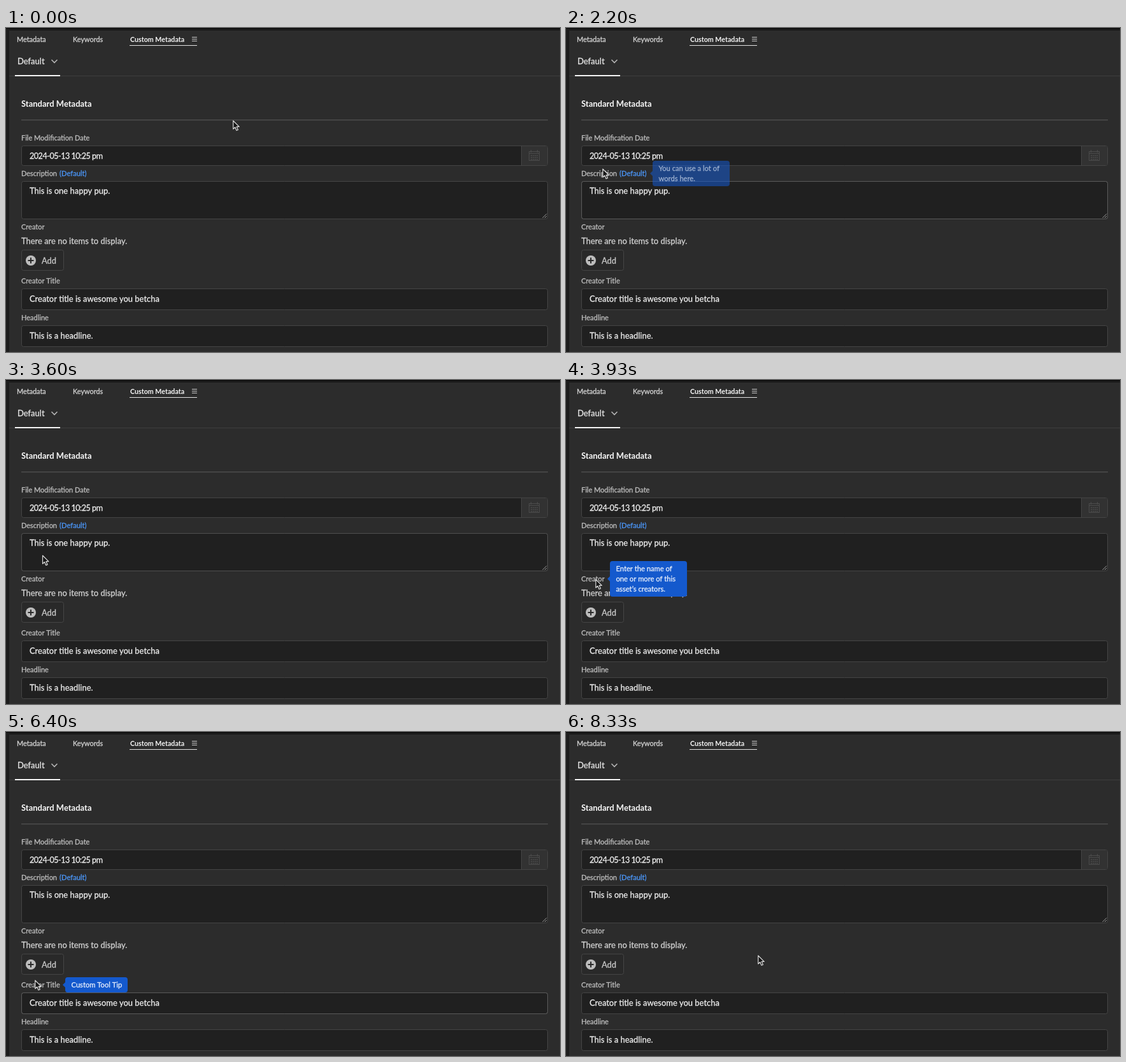
These frames come from a looping animation (870 by 510 pixels, 8.47 s). An HTML page with a canvas:

```html
<!DOCTYPE html>
<html lang="en">
<head>
<meta charset="utf-8">
<title>Custom Metadata</title>
<style>
html, body { margin: 0; width: 100%; height: 100%; overflow: hidden; background: #2b2b2b; }
canvas { display: block; }
</style>
</head>
<body>
<canvas id="stage" width="870" height="510"></canvas>
<script>
const ctx = document.getElementById('stage').getContext('2d');
const LOOP = 8470, RATE = 0.015;
const LEFT = 24, WIDE = 827, INDENT = 37;
const BG = '#2c2c2c', FIELD = '#202020', EDGE = '#454545', HOVER = '#5a5a5a';
const BLUE = '#1459cd', LABEL = '#bebebe', VALUE = '#ededed', LINK = '#4b96f8';

// Pointer moves: each leg bends towards (cx, cy) on its way to (x, y)
const home = { x: 356, y: 146 };
const legs = [
  { from: 2, to: 15, x: 110, y: 182, cx: -75, cy: 85, pow: 1 },
  { from: 19, to: 21, x: 111, y: 178, cx: 110, cy: 180, pow: 1 },
  { from: 24, to: 33, x: 57, y: 222, cx: 215, cy: 290, pow: 1 },
  { from: 48, to: 59, x: 46, y: 314, cx: 64, cy: 270, pow: 0.9 },
  { from: 85, to: 96, x: 45, y: 391, cx: 18, cy: 350, pow: 1.6 },
  { from: 117, to: 125, x: 301, y: 352, cx: 150, cy: 375, pow: 1 }
];

const tips = [
  { x: 139, mid: 229, w: 121, from: 32, to: 51, lines: ['You can use a lot of', 'words here.'] },
  { x: 69, mid: 313, w: 121, from: 56, to: 88, lines: ['Enter the name of', 'one or more of this', 'asset\u2019s creators.'] },
  { x: 93, mid: 398, w: 98, from: 93, to: 119, lines: ['Custom Tool Tip'] }
];

const clamp = v => Math.min(1, Math.max(0, v));
const span = (k, from, to, time) => clamp((k - from) / time) * (1 - clamp((k - to) / time));
const bend = (a, c, b, p) => a * (1 - p) ** 2 + 2 * c * p * (1 - p) + b * p * p;

function text(str, x, y, size, color, weight = 400, gap = 0) {
  ctx.font = `${weight} ${size}px Lato, "Open Sans", sans-serif`;
  ctx.letterSpacing = gap + 'px';
  ctx.fillStyle = ctx.strokeStyle = color;
  ctx.fillText(str, x, y);
  if (weight > 400) return;
  ctx.lineWidth = 0.3;
  ctx.strokeText(str, x, y);
}

const label = (str, y) => text(str, LEFT, y, 11, LABEL);
const value = (str, y) => text(str, INDENT, y, 12.95, VALUE);

function rect(x, y, w, h, color) {
  ctx.fillStyle = color;
  ctx.fillRect(x, y, w, h);
}

function line(points, color, width = 1) {
  ctx.beginPath();
  points.forEach(p => ctx.lineTo(...p));
  ctx.strokeStyle = color;
  ctx.lineWidth = width;
  ctx.stroke();
}

function box(y, h, hover = 0, w = WIDE, fill = FIELD) {
  ctx.beginPath();
  ctx.roundRect(LEFT + 0.5, y + 0.5, w - 1, h - 1, 3);
  ctx.fillStyle = fill;
  ctx.fill();
  ctx.lineWidth = 1;
  ctx.strokeStyle = EDGE;
  ctx.stroke();
  ctx.globalAlpha = hover;
  ctx.strokeStyle = HOVER;
  ctx.stroke();
  ctx.globalAlpha = 1;
}

function calendar(x, y) {
  const c = '#4b4b4b';
  ctx.strokeStyle = c;
  ctx.lineWidth = 1;
  ctx.strokeRect(x + 0.5, y + 2.5, 16, 14);
  rect(x, y + 5, 17, 1, c);
  for (const dx of [3, 13]) rect(x + dx, y, 1, 4, c);
  for (let i = 0; i < 12; i++) rect(x + 3 + i % 4 * 3, y + 8 + Math.floor(i / 4) * 3, 2, 1.5, c);
}

function header() {
  rect(0, 0, 870, 510, BG);
  rect(0, 0, 870, 4, '#1a1a1a');
  rect(0, 0, 5, 510, '#1d1d1d');
  rect(0, 0, 870, 1, '#050505');
  text('Metadata', 17, 22, 10.9, '#d4d4d4');
  text('Keywords', 105, 22, 10.9, '#d4d4d4');
  text('Custom Metadata', 195, 22, 10.7, '#f5f5f5', 700);
  for (let i = 0; i < 3; i++) rect(292, 14 + i * 3, 8, 1, '#d0d0d0');
  rect(194, 27, 106, 1, '#e4e4e4');
  text('Default', 18, 57, 13, '#e6e6e6');
  line([[71.5, 50], [76, 54.5], [80.5, 50]], '#b5b5b5', 1.6);
  rect(5, 75, 865, 1, '#3e3e3e');
  rect(14, 74, 71, 2, '#f4f4f4');
  text('Standard Metadata', LEFT, 124, 13, '#fafafa', 700);
  rect(LEFT, 144, WIDE, 1.5, '#4c4c4c');
}

function form(k) {
  label('File Modification Date', 177);
  box(185, 32);
  rect(809, 186, 41, 30, '#323232');
  rect(809, 186, 1, 30, EDGE);
  calendar(821, 192);
  text('2024-05-13 10:25 pm', INDENT, 205.5, 12.6, VALUE, 400, -0.5);

  label('Description', 233);
  text('(Default)', 84, 233, 11.2, LINK);
  box(241, 60, span(k, 28, 53, 2));
  value('This is one happy pup.', 260.5);
  line([[842.5, 299], [849, 292.5]], '#a0a0a0');
  line([[846, 299], [849, 296]], '#a0a0a0');

  label('Creator', 317);
  text('There are no items to display.', LEFT, 339.5, 12.95, '#d4d4d4');
  box(349, 33, 0, 67, '#292929');
  ctx.beginPath();
  ctx.arc(39, 366, 8, 0, Math.PI * 2);
  ctx.fillStyle = '#bdbdbd';
  ctx.fill();
  rect(34.5, 365, 9, 2, '#292929');
  rect(38, 361.5, 2, 9, '#292929');
  text('Add', 56, 371, 12.9, '#cacaca');

  label('Creator Title', 402);
  box(410, 34, span(k, 93, 119, 2));
  value('Creator title is awesome you betcha', 431);

  label('Headline', 460);
  box(468, 34);
  value('This is a headline.', 489);
}

function tooltip(tip, k) {
  const p = span(k, tip.from, tip.to, 3);
  if (!p) return;
  const h = tip.lines.length * 16 + 8;
  const x = tip.x - 4.5 * (1 - p), y = tip.mid - h / 2;
  ctx.globalAlpha = 1 - (1 - p) ** 2;
  ctx.fillStyle = BLUE;
  ctx.beginPath();
  ctx.roundRect(x, y, tip.w, h, 4);
  ctx.moveTo(x, tip.mid - 4);
  ctx.lineTo(x - 4, tip.mid);
  ctx.lineTo(x, tip.mid + 4);
  ctx.fill();
  tip.lines.forEach((s, i) => text(s, x + 9.5, y + 16 + i * 16, 11.2, '#e6eefc'));
  ctx.globalAlpha = 1;
}

function pointer(k) {
  let { x, y } = home;
  for (const leg of legs) {
    const p = clamp((k - leg.from) / (leg.to - leg.from)) ** leg.pow;
    x = bend(x, leg.cx, leg.x, p);
    y = bend(y, leg.cy, leg.y, p);
    if (p < 1) break;
  }
  ctx.save();
  ctx.translate(x + 0.8, y);
  ctx.beginPath();
  [[0, 0], [0, 13], [3, 10.2], [5.2, 15.3], [7.6, 14.3], [5.4, 9.4], [9.4, 9.4]].forEach(q => ctx.lineTo(...q));
  ctx.closePath();
  ctx.fillStyle = '#161616';
  ctx.fill();
  ctx.lineJoin = 'round';
  ctx.lineWidth = 1.2;
  ctx.strokeStyle = '#dcdcdc';
  ctx.stroke();
  ctx.restore();
}

function draw(now) {
  const k = Math.floor(now % LOOP * RATE + 0.1);
  header();
  form(k);
  tips.forEach(tip => tooltip(tip, k));
  pointer(k);
}

const start = performance.now();
function tick() {
  draw(performance.now() - start);
  requestAnimationFrame(tick);
}
tick();
</script>
</body>
</html>
```
